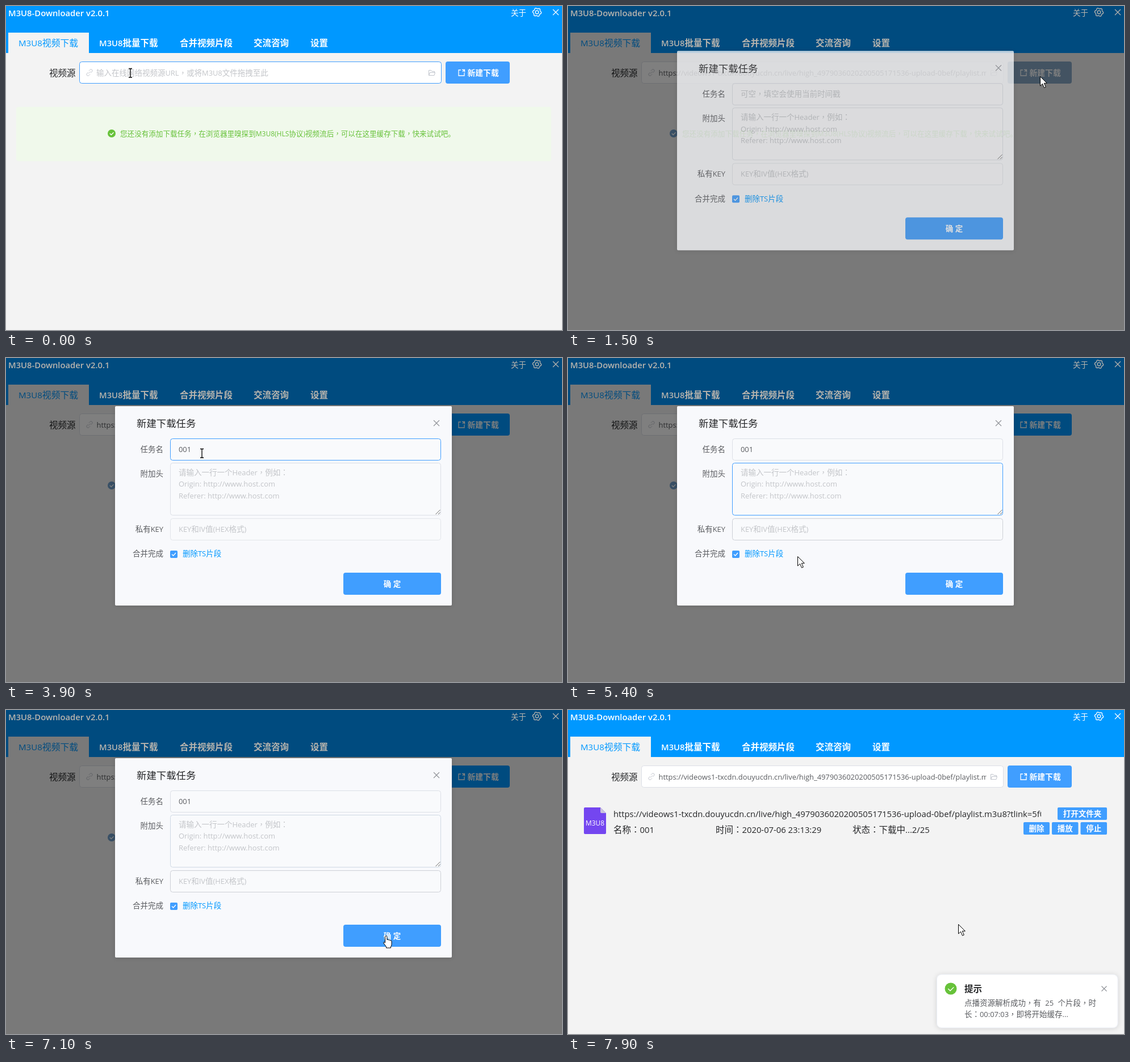
Recreate the animation shown at these times as an HTML page. Size 979x572 px, loop 8000 ms.

```html
<!DOCTYPE html>
<html lang="zh-CN">
<head>
<meta charset="utf-8">
<style>
html, body { margin: 0; width: 100%; height: 100%; overflow: hidden; background: #f3f3f3; }
svg { display: block; font-family: 'Open Sans', 'Noto Sans CJK SC', 'Noto Sans CJK', sans-serif; }
.latin { font-size: .955em; }
.mid { font-family: 'Noto Sans CJK TC', 'Noto Sans CJK', sans-serif; }
</style>
</head>
<body>
<script>
const LOOP = 8000, STEP = 100;
const BLUE = '#409eff', HEAD = '#0098ff', PAGE = '#f3f3f3', GREEN = '#67c23a';
const LINE = '#dcdfe6', HOVER = '#c0c4cc', HINT = '#c3c5c9', GREY = '#5a5c60', DARK = '#252628';
const PATH_URL = 'https://videows1-txcdn.douyucdn.cn/live/high_4979036020200505171536-upload-0bef/playlist.m3u8?tlink=5f0';

// Latin runs are slightly smaller than the Chinese glyphs; commas and colons sit mid-cell
const runs = s => s.replace(/([ -~]+)|[，：]/g, (run, latin) =>
  latin ? `<tspan class="latin">${run}</tspan>` : `<tspan class="mid" lang="zh-TW">${run}</tspan>`);
const text = (x, y, size, s, fill, extra = '') =>
  `<text x="${x}" y="${y + size * .37}" font-size="${size}" fill="${fill}" ${extra}>${runs(s)}</text>`;
const rect = (x, y, w, h, fill, extra = '') =>
  `<rect x="${x}" y="${y}" width="${w}" height="${h}" fill="${fill}" ${extra}/>`;
const line = (d, color, extra = '') => `<path d="${d}" fill="none" stroke="${color}" ${extra}/>`;
const cross = (x, y, r, color) => line(`M${x - r} ${y - r}l${2 * r} ${2 * r}m0 ${-2 * r}l${-2 * r} ${2 * r}`, color, 'stroke-width="1.2"');
const badge = (x, y, r, id) => `<circle ${id} cx="${x}" cy="${y}" r="${r}" fill="${GREEN}"/>` +
  line(`M${x - r * .45} ${y}l${r * .35} ${r * .35} ${r * .6} ${-r * .6}`, '#fff', 'stroke-width="1.4"');
const field = (id, y, h) => rect(289.5, y + .5, 476, h, '#f9fafc', `id="${id}" rx="4" stroke="${LINE}"`);
const button = (x, y, w, h, s, size) => rect(x, y, w, h, BLUE, 'rx="2"') +
  text(x + w / 2, y + h / 2, size, s, '#fff', 'text-anchor="middle" font-weight="600"');
const label = (y, s) => text(277, y, 13.5, s, GREY, 'text-anchor="end"');
const BOLD = 'font-weight="600"';

const gear = Array.from({ length: 24 }, (_, i) => {
  const a = i * Math.PI / 12, r = i % 4 < 2 ? 7.6 : 6.2;
  return `${(935 + r * Math.cos(a)).toFixed(1)} ${(11 + r * Math.sin(a)).toFixed(1)}`;
}).join('L');

const header = text(4, 12, 15.5, 'M3U8-Downloader v2.0.1', 'currentColor', BOLD) +
  text(889, 12, 13.5, '关于', 'currentColor') +
  line(`M${gear}Z`, 'currentColor', 'stroke-width="1.3"') +
  '<circle cx="935" cy="11" r="2.8" fill="none" stroke="currentColor" stroke-width="1.3"/>' +
  cross(968, 11, 5, 'currentColor') +
  [[164, 'M3U8批量下载'], [306, '合并视频片段'], [436, '交流咨询'], [536, '设置']]
    .map(([x, s]) => text(x, 65, 15.5, s, 'currentColor', BOLD)).join('');

const sourceBar = text(76, 118, 15.5, '视频源', DARK) +
  rect(129.5, 98.5, 637, 38, '#fff', 'id="source" rx="4"') +
  line('M146 115l2-2a2.3 2.3 0 0 1 3.4 3.4l-2 2M148 121l-2 2a2.3 2.3 0 0 1-3.4-3.4l2-2M145 120l4-4', HOVER, 'transform="translate(0 -.5)"') +
  line('M744.5 122.500v-9h4l1.500 2h4.500v2m-10 5l2-5h9l-1.500 5z', HOVER) +
  text(159, 118, 13.5, '输入在线网络视频源URL，或将M3U8文件拖拽至此', HINT, 'id="sourceHint"') +
  `<g clip-path="url(#cutField)">${text(159.5, 118, 13.5, PATH_URL, GREY, 'id="sourceText"')}</g>` +
  rect(774, 98, 113, 39, BLUE, 'id="create" rx="4"') +
  line('M801 113h-4v10h10v-5M803 112.500h4.500v4.500M807 113l-3 3', '#fff', 'stroke-width="1.3"') +
  text(812.5, 118, 13.8, '新建下载', '#fff', BOLD);

const tip = rect(18, 178, 942, 96, '#f0f9eb', 'id="tipBox" rx="4"') + badge(186, 225, 7, 'id="tipBadge"') +
  text(201, 225, 12.57, '您还没有添加下载任务，在浏览器里嗅探到M3U8(HLS协议)视频流后，可以在这里缓存下载，快来试试吧。', GREEN);

const task = '<path d="M30 172h27l10 10v35a2 2 0 0 1-2 2h-35a2 2 0 0 1-2-2v-43a2 2 0 0 1 2-2z" fill="#7446f0"/>' +
  '<path d="M57 172l10 10h-8a2 2 0 0 1-2-2z" fill="#c9c3dc"/>' +
  text(47.5, 199, 12.5, 'M3U8', '#fff', 'text-anchor="middle"') +
  `<g clip-path="url(#cutTask)">${text(80, 183, 15.5, PATH_URL, DARK)}</g>` +
  text(80, 211, 15.5, '名称：001', DARK) + text(260, 211, 15.5, '时间：2020-07-06 23:13:29', DARK) +
  text(501, 211, 15.5, '状态：下载中...', DARK, 'id="state"') +
  button(862, 172, 87, 22, '打开文件夹', 13.5) + button(802, 198, 46, 22, '删除', 13.5) +
  button(852, 198, 46.5, 22, '播放', 13.5) + button(902.5, 198, 46.5, 22, '停止', 13.5);

const dialog = rect(192, 85, 593, 352, '#f8f9fc', 'rx="2" filter="url(#shadow)"') +
  text(230, 116, 17.4, '新建下载任务', DARK) + cross(758, 115, 5, '#909399') +
  label(161, '任务名') + field('name', 142, 38) +
  text(304, 161, 13.5, '可空，填空会使用当前时间戳', HINT, 'id="nameHint"') +
  text(304, 161, 13.5, '', GREY, 'id="nameText"') +
  label(204, '附加头') + field('head', 185, 92) +
  ['请输入一行一个Header，例如：', 'Origin: http://www.host.com', 'Referer: http://www.host.com']
    .map((s, i) => text(304, 202 + i * 20.3, 13.5, s, HINT)).join('') +
  line('M756.500 276l8-8m-3.500 8l3.500-3.500', '#666') +
  label(302, '私有KEY') + field('key', 283, 38) + text(304, 302, 13.5, 'KEY和IV值(HEX格式)', HINT) +
  label(345.5, '合并完成') + rect(289, 340, 13, 13, BLUE, 'rx="2"') +
  line('M292 346.500l2.500 2.500 4.500-5', '#fff', 'stroke-width="1.3"') +
  text(311, 345.5, 13.5, '删除TS片段', HEAD) +
  rect(594, 379, 172, 39, BLUE, 'rx="4"') + text(680, 399, 13.5, '确 定', '#fff', `text-anchor="middle" ${BOLD}`);

const toast = rect(649.5, 467, 318.5, 94, '#fff', 'rx="8" stroke="#ebeef5" filter="url(#shadow)"') +
  badge(674, 492, 10.5, '') + text(698, 492, 15.5, '提示', DARK, BOLD) + cross(944, 492, 4.500, '#909399') +
  text(698, 517.5, 13.5, '点播资源解析成功，有 25 个片段，时', GREY, 'word-spacing="4"') +
  text(698, 537.5, 13.5, '长：00:07:03，即将开始缓存...', GREY);

const pointers = `<g id="pointer">
<path id="arrow" d="M.5.500v16.500l4-3.700 3 7 2.800-1.200-3-6.800h5z" fill="#fff" stroke="#000"/>
<path id="beam" d="M-3-7.500h2.200l.8.800.8-.8h2.200M0-7v14.500M-3 8h2.200l.8-.8.8.8h2.200" fill="none" stroke="#000" stroke-width="1.3"/>
<path id="hand" d="M-1.500 12V1.500a1.700 1.700 0 0 1 3.400 0v5q2.500-1 3 .6 2.400-.7 2.800.8 2.300-.4 2.300 1.600v5q0 2.500-1.500 4.500v2h-8v-2l-4.300-6q-1-2.500.8-2.500z" fill="#fff" stroke="#000"/>
</g>`;

document.body.innerHTML = `<svg width="979" height="572" viewBox="0 0 979 572">
<defs>
<clipPath id="cutField"><rect x="150" y="100" width="586.500" height="34"/></clipPath>
<clipPath id="cutTask"><rect x="80" y="170" width="753" height="26"/></clipPath>
<filter id="shadow" x="-10%" y="-20%" width="120%" height="140%"><feDropShadow dx="0" dy="1" stdDeviation="4" flood-opacity=".14"/></filter>
</defs>
${rect(0, 0, 979, 572, PAGE)}${rect(0, 0, 979, 83, HEAD)}${rect(4, 47, 142, 36, PAGE)}
${text(22, 65, 15.8, 'M3U8视频下载', HEAD)}
${sourceBar}<g id="tip">${tip}</g><g id="task">${task}</g>
${rect(0, 0, 979, 572, '#000', 'id="shade"')}<g id="header">${header}</g>
<g id="dialog">${dialog}</g><g id="toast">${toast}</g>${pointers}</svg>`;

const $ = id => document.getElementById(id);
const set = (id, name, value) => $(id).setAttribute(name, value);
const show = (id, on) => set(id, 'display', on ? 'inline' : 'none');
const clamp = v => Math.min(1, Math.max(0, v));

// time, x, y, pointer shape from that time on
const moves = [
  [0, 219, 118, 'beam'], [400, 219, 118, 'beam'], [600, 420, 150, 'arrow'], [900, 854, 180, 'arrow'],
  [1000, 838, 132, 'hand'], [1100, 831, 124, 'hand'], [1300, 831, 124, 'arrow'], [1600, 831, 124, 'arrow'],
  [1800, 790, 138, 'arrow'], [2100, 560, 205, 'beam'], [2500, 362, 206, 'beam'], [2700, 362, 206, 'beam'],
  [2900, 358, 174, 'beam'], [3200, 345, 168, 'beam'], [4000, 345, 168, 'beam'], [4300, 385, 265, 'beam'],
  [4700, 525, 270, 'beam'], [4900, 440, 312, 'beam'], [5100, 332, 342, 'arrow'], [5400, 404, 350, 'arrow'],
  [5600, 553, 372, 'arrow'], [5800, 595, 355, 'arrow'], [6000, 618, 331, 'arrow'], [6200, 643, 308, 'beam'],
  [6500, 643, 308, 'beam'], [6700, 652, 345, 'arrow'], [6900, 669, 399, 'hand'], [7200, 669, 399, 'hand'],
  [7300, 669, 399, 'arrow'], [7800, 687, 378, 'arrow'], [LOOP, 687, 378, 'arrow']
];

function movePointer(t) {
  const i = moves.findIndex(m => m[0] > t) - 1;
  const [t0, x0, y0, shape] = moves[i], [t1, x1, y1] = moves[i + 1];
  const p = (t - t0) / (t1 - t0);
  set('pointer', 'transform', `translate(${x0 + (x1 - x0) * p} ${y0 + (y1 - y0) * p})`);
  for (const id of ['arrow', 'beam', 'hand']) show(id, id === shape);
}

function draw(t) {
  const between = (a, b) => t >= a && t < b;
  const leaving = clamp((t - 7200) / 300);
  const opened = clamp((t - 1290) / 275) * (1 - leaving);
  const shade = clamp((t - 1250) / 220) * (1 - leaving);
  const pasted = t >= 400, listed = t >= 7500, dimmed = shade > .4;

  set('source', 'stroke', t < 1200 ? BLUE : LINE);
  show('sourceHint', !pasted);
  show('sourceText', pasted);
  set('create', 'fill', between(1000, 1300) ? '#66b1ff' : between(1300, 2900) ? '#88a8c6' : dimmed ? HEAD : BLUE);

  show('tip', !listed);
  set('tipBox', 'fill', dimmed ? PAGE : '#f0f9eb');
  set('tipBadge', 'fill', dimmed ? '#70a0cc' : GREEN);
  show('task', listed);
  $('state').innerHTML = runs(`状态：下载中...${Math.floor(clamp((t - 7500) / 400) * 2)}/25`);

  set('shade', 'opacity', shade * .5);
  set('header', 'color', dimmed ? '#b8b4ae' : '#fff');
  show('dialog', opened > 0);
  set('dialog', 'opacity', opened);
  set('dialog', 'transform', `translate(0 ${-24 * (1 - opened)})`);

  const typed = '001'.slice(0, t < 3300 ? 0 : Math.floor((t - 3300) / 150) + 1);
  $('nameText').innerHTML = runs(typed);
  show('nameHint', !typed);
  set('name', 'stroke', between(2900, 4400) ? BLUE : LINE);
  set('head', 'stroke', between(4400, 5900) ? BLUE : between(2100, 2800) ? HOVER : t >= 5900 ? '#cfd9e4' : LINE);
  set('key', 'stroke', t >= 4900 ? '#cdd0d6' : '#e2e5ea');

  show('toast', t >= 7600);
  set('toast', 'transform', `translate(${330 * (1 - clamp((t - 7600) / 300)) ** 1.5} 0)`);
  movePointer(t);
}

function tick(now) {
  draw(Math.floor(now % LOOP / STEP) * STEP);
  requestAnimationFrame(tick);
}
draw(0);
requestAnimationFrame(tick);
</script>
</body>
</html>
```
